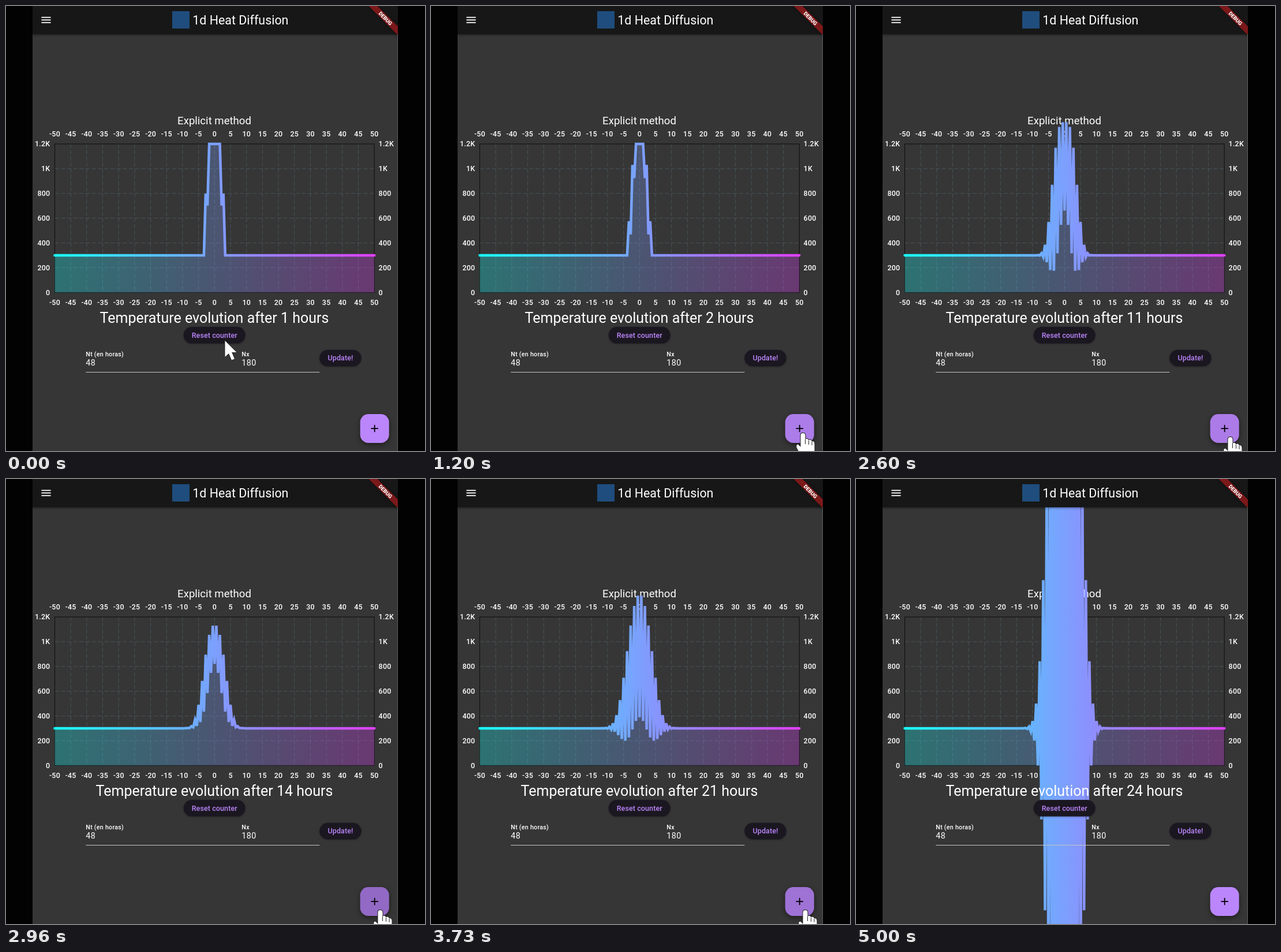
An HTML page with a canvas that plays this animation: 726x771 px, repeating every 5200 ms.

```html
<!DOCTYPE html>
<html lang="en">
<head>
<meta charset="utf-8">
<title>1d Heat Diffusion</title>
<style>
  html, body { margin: 0; height: 100%; overflow: hidden; background: #020203; }
  canvas { display: block; }
</style>
</head>
<body>
<canvas id="stage" width="726" height="771"></canvas>
<script>
const ctx = document.getElementById('stage').getContext('2d');
const LOOP = 5200, TWEEN = 75;
const PLOT = { left: 84.5, right: 638.2, top: 239, bottom: 496.2 };
const ACCENT = '#bb86fc', FONT = 'Roboto, sans-serif';

// Times at which the hour counter goes up, starting from hour 1.
const CLICKS = [1080, 1310, 1440, 1570, 1700, 1830, 1960, 2110, 2290, 2500, 2700, 2810,
  2937, 3010, 3072, 3134, 3220, 3310, 3560, 3690, 3815, 3948, 4080];

// Explicit scheme for the heat equation, slightly above the stability limit.
const HALF = 90, NODES = 2 * HALF + 1, R = 0.5535;
const hours = [Array.from({ length: NODES }, (_, i) => Math.abs(i - HALF) <= 4 ? 1200 : 300)];
while (hours.length < 26) {
  const u = hours[hours.length - 1];
  hours.push(u.map((v, i) => i && i < NODES - 1 ? v + R * (u[i - 1] - 2 * v + u[i + 1]) : v));
}

const clamp = v => Math.max(0, Math.min(1, v));
const ramp = (t, from, to) => clamp((t - from) / (to - from));
const smooth = p => p * p * (3 - 2 * p);
const mix = (a, b, p) => a + (b - a) * p;
const plotX = x => mix(PLOT.left, PLOT.right, (x + 50) / 100);
const plotY = v => mix(PLOT.bottom, PLOT.top, v / 1200);

function heatAt(t) {
  let hour = 1, u = hours[1];
  CLICKS.forEach((start, k) => {
    if (t < start) return;
    const end = Math.min(t, CLICKS[k + 1] ?? LOOP);
    const p = ramp(end, start, start + TWEEN), target = hours[k + 2];
    u = u.map((v, i) => mix(v, target[i], p));
    hour = k + 2;
  });
  return { hour, u };
}

function text(str, x, y, size, { color = '#fff', weight = 400, align = 'left', spacing = 0 } = {}) {
  ctx.font = `${weight} ${size}px ${FONT}`;
  ctx.fillStyle = color;
  ctx.textAlign = align;
  ctx.letterSpacing = spacing + 'px';
  ctx.fillText(str, x, y + size * 0.355);
}

function rect(x, y, w, h, color, radius = 0) {
  ctx.fillStyle = color;
  ctx.beginPath();
  ctx.roundRect(x, y, w, h, radius);
  ctx.fill();
}

function segment(x1, y1, x2, y2) {
  ctx.beginPath();
  ctx.moveTo(x1, y1);
  ctx.lineTo(x2, y2);
  ctx.stroke();
}

function withShadow(color, blur, dy, draw) {
  ctx.save();
  ctx.shadowColor = color;
  ctx.shadowBlur = blur;
  ctx.shadowOffsetY = dy;
  draw();
  ctx.restore();
}

function drawAxes() {
  const label = { weight: 500, spacing: 0.2 };
  text('Explicit method', 361, 198.5, 18.6, { align: 'center' });
  ctx.save();
  ctx.strokeStyle = 'rgba(96,125,139,.42)';
  ctx.lineWidth = 1;
  ctx.setLineDash([7.1, 3.6]);
  for (let x = -50; x <= 50; x += 5) {
    const px = plotX(x);
    if (Math.abs(x) < 50) segment(px, PLOT.top, px, PLOT.bottom);
    for (const y of [222, 513.5]) text(String(x), px, y, 12.5, { ...label, align: 'center' });
  }
  for (let v = 0; v <= 1200; v += 200) {
    const y = plotY(v), name = v < 1000 ? String(v) : v / 1000 + 'K';
    if (v && v < 1200) segment(PLOT.left, y, PLOT.right, y);
    text(name, 76.3, y, 12.5, { ...label, align: 'right' });
    text(name, 645.6, y, 12.5, label);
  }
  ctx.setLineDash([]);
  ctx.strokeStyle = '#0c0c0c';
  ctx.strokeRect(PLOT.left, PLOT.top, PLOT.right - PLOT.left, PLOT.bottom - PLOT.top);
  ctx.restore();
}

function drawCurve(u) {
  const tint = ctx.createLinearGradient(PLOT.left, 0, PLOT.right, 0);
  tint.addColorStop(0, '#18ffff');
  tint.addColorStop(1, '#e040fb');
  const line = new Path2D();
  u.forEach((v, i) => line.lineTo(plotX((i - HALF) * 50 / HALF), plotY(v)));
  const area = new Path2D(line);
  area.lineTo(PLOT.right, PLOT.bottom);
  area.lineTo(PLOT.left, PLOT.bottom);
  ctx.save();
  ctx.fillStyle = ctx.strokeStyle = tint;
  ctx.globalAlpha = 0.3;
  ctx.fill(area);
  ctx.globalAlpha = 1;
  ctx.lineWidth = 4.5;
  ctx.lineCap = 'round';
  ctx.miterLimit = 4;
  ctx.stroke(line);
  ctx.restore();
}

function pill(str, x, y, w, glow = 0) {
  withShadow('rgba(0,0,0,.35)', 3, 1, () => rect(x, y, w, 28.6, '#1b1720', 14.3));
  if (glow) rect(x, y, w, 28.6, `rgba(187,134,252,${glow})`, 14.3);
  text(str, x + w / 2, y + 14.2, 12.5, { color: ACCENT, weight: 500, align: 'center', spacing: 0.09 });
}

function field(name, value, x) {
  text(name, x, 603.5, 10.7, { weight: 500, spacing: 0.25 });
  text(value, x, 618, 14.3, { spacing: 0.45 });
}

function drawForm(t, hour) {
  text(`Temperature evolution after ${hour} hours`, 361, 540, 25, { align: 'center' });
  pill('Reset counter', 307.7, 556, 107, 0.07 * ramp(t, 30, 160) * (1 - ramp(t, 380, 480)));
  field('Nt (en horas)', '48', 138.3);
  field('Nx', '180', 408.3);
  rect(138.3, 634, 405, 1, '#c6c6c6');
  pill('Update!', 543.2, 595.7, 72.5);
}

function drawAddButton(t) {
  const hover = ramp(t, 790, 860) * (1 - ramp(t, 4820, 4920));
  const press = Math.max(...CLICKS.map(c => ramp(t, c - 100, c - 60) * (1 - ramp(t, c, c + 85))));
  const box = [613.7, 707, 50, 50];
  withShadow('rgba(0,0,0,.45)', 8, 3, () => rect(...box, ACCENT, 14.3));
  rect(...box, `rgba(0,0,0,${0.08 * hover + 0.14 * press})`, 14.3);
  rect(632.5, 731.1, 12.4, 1.8, '#000');
  rect(637.8, 725.8, 1.8, 12.4, '#000');
}

function drawAppBar() {
  withShadow('rgba(0,0,0,.5)', 4, 1, () => rect(46, 0, 633, 49, '#171717'));
  for (const y of [18.8, 23.3, 27.8]) rect(61.4, y, 16.2, 1.8, '#fff');
  rect(288, 9, 30, 30, '#1f4d7d');
  text('1d Heat Diffusion', 323.3, 24.3, 21.4);
  ctx.save();
  ctx.translate(679, 0);
  ctx.rotate(Math.PI / 4);
  withShadow('rgba(0,0,0,.5)', 5, 0, () => rect(-45, 25, 90, 10.7, '#7b181a'));
  text('DEBUG', 0, 30.4, 9.1, { weight: 900, align: 'center' });
  ctx.restore();
}

const ARROW = new Path2D('M0 0V28L6.5 22 11.5 33.5 16.5 31.2 11.6 20H20Z');
const HAND = new Path2D('M-4 4Q-4 0 0 0Q4 0 4 4V11Q8 8 10 12.500Q14 10 15.500 14.500' +
  'Q20 13 20 19V31L16 40H-3L-11 25Q-12 19 -8 20L-4 24Z');

function drawCursor(t) {
  const go = smooth(ramp(t, 350, 860)), drift = smooth(ramp(t, 1300, 1700));
  const leave = ramp(t, 4740, 4990) ** 2;
  if (leave === 1) return;
  const x = mix(379.5, 644.5, go) + 4 * drift;
  const y = mix(580 + 3 * ramp(t, 30, 160), 740, go) + 7 * drift + 30 * leave;
  const shape = x > 613 && y > 705 ? HAND : ARROW;
  ctx.save();
  ctx.translate(x, y);
  ctx.fillStyle = '#fff';
  ctx.strokeStyle = '#222';
  ctx.lineWidth = 2;
  ctx.lineJoin = 'round';
  ctx.stroke(shape);
  ctx.fill(shape);
  if (shape === HAND) {
    ctx.lineWidth = 1;
    segment(4, 11, 4, 19);
    segment(10, 13, 10, 20);
    segment(15.5, 15, 15.5, 21);
  }
  ctx.restore();
}

function frame() {
  const t = performance.now() % LOOP, { hour, u } = heatAt(t);
  rect(0, 0, 726, 771, '#020203');
  ctx.save();
  ctx.beginPath();
  ctx.rect(46, 0, 633, 771);
  ctx.clip();
  rect(46, 0, 633, 771, '#363636');
  drawAxes();
  drawCurve(u);
  drawForm(t, hour);
  drawAddButton(t);
  drawAppBar();
  rect(678, 49, 1, 722, '#626262');
  ctx.restore();
  drawCursor(t);
  requestAnimationFrame(frame);
}
frame();
</script>
</body>
</html>
```
